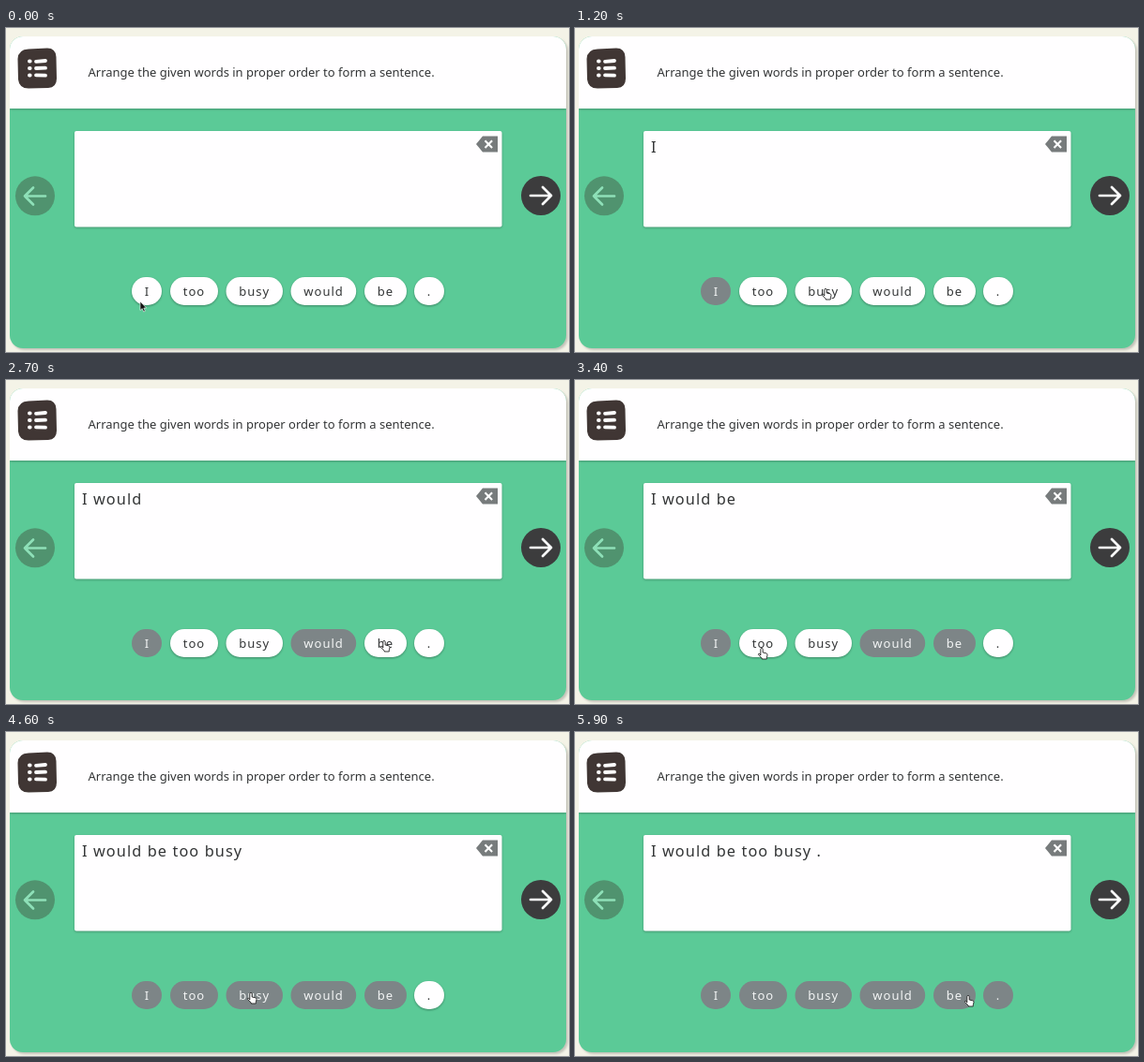
Write an HTML page that moves like this. It is 600x346 px and loops after 6000 ms.

```html
<!DOCTYPE html>
<html lang="en">
<head>
<meta charset="utf-8">
<title>Arrange the words</title>
<style>
  html, body { margin: 0; width: 100%; height: 100%; overflow: hidden; background: #f4f3e7; }
  svg { display: block; width: 600px; height: 346px; }
  text { font-family: "Noto Sans", sans-serif; fill: #333536; white-space: pre; }
  .title { font-size: 13px; }
  .answer { font-size: 16.3px; letter-spacing: 1.1px; }
  .pill text { font-size: 13px; letter-spacing: 1px; }
  .pill rect { fill: #fffeff; filter: drop-shadow(0 1px 1px #0005); }
  .pill.used rect { fill: #7d8587; filter: none; }
  .pill.used text { fill: #f3f5f5; }
  .arrow { fill: none; stroke-width: 2.7; stroke-linecap: round; stroke-linejoin: round; }
  .board { filter: drop-shadow(0 1px 1px #0004); }
  .card { filter: drop-shadow(2px 2px 1px #0003); }
  #hand { fill: #fff; stroke: #222; stroke-width: .9; stroke-linejoin: round; }
  #pointer { fill: #111; stroke: #fff; stroke-width: .6; }
</style>
</head>
<body>
<svg viewBox="0 0 600 346">
  <defs>
    <clipPath id="cardShape"><rect x="4" y="9" width="593" height="333" rx="14"/></clipPath>
  </defs>
  <rect class="card" x="4" y="9" width="593" height="333" rx="14" fill="#5bca97"/>
  <g clip-path="url(#cardShape)">
    <rect class="board" x="4" y="0" width="593" height="86" fill="#fffeff"/>
  </g>

  <path d="M24 22.5L44 21.5Q53 21.5 53.5 31L54 54Q54 63.5 45 64L24 64.5Q14 64.5 13 55L12.5 33Q13 23 24 22.5Z" fill="#403634"/>
  <g stroke="#fff" stroke-width="4" stroke-linecap="round">
    <path d="M25 35.5h.6M25 43h.6M25 50.5h.6"/>
    <path d="M32 35.8L42 35M32 43L42 42.7M32 50.3L42 50.6" stroke-width="3.8"/>
  </g>
  <text class="title" x="87.5" y="52">Arrange the given words in proper order to form a sentence.</text>

  <rect class="board" x="73" y="110" width="455.5" height="102.5" rx="2" fill="#fffeff"/>
  <path d="M501 124L508 115.5H524V132.500H508Z" fill="#777b7c"/>
  <path d="M510.500 120.300l7.600 7.600m0 -7.600l-7.600 7.600" stroke="#fff" stroke-width="2.100"/>

  <circle cx="31" cy="179.300" r="21" fill="#50936f"/>
  <path class="arrow" d="M42 179.500H20M29 170.500l-9 9l9 9" stroke="#8ee0b8"/>
  <circle cx="570" cy="179" r="21" fill="#3c3c3d"/>
  <path class="arrow" d="M559 179H581M572 170l9 9l-9 9" stroke="#fff"/>

  <text class="answer" id="answer" x="81" y="133"></text>
  <g id="pills"></g>
  <g id="cursor">
    <path id="hand" d="M-1.200 7V.6Q-1 -.6 0 -.6T1.200 .6V4L4.800 4.800Q6.200 5.200 6 6.800L5.300 9.500V11H.2V10L-3.600 6.300Q-3.500 4.700 -2.300 5.300Z"/>
    <path id="pointer" d="M0 0V9.500L2.200 7.600L3.700 11L5.300 10.300L3.800 7H6.600Z"/>
  </g>
</svg>
<script>
  const LOOP = 6000, STEP = 100;
  const SVG = "http://www.w3.org/2000/svg";
  const byId = id => document.getElementById(id);

  // word, left edge, width, moment of the click
  const pills = [
    ["I", 134, 32, 500],
    ["too", 175, 51, 3700],
    ["busy", 234.5, 60.5, 4500],
    ["would", 303.5, 69.7, 1800],
    ["be", 382, 45, 2900],
    [".", 435, 32, 5600]
  ].map(([word, x, width, click]) => ({ word, x, width, click }));
  const clickOrder = [...pills].sort((a, b) => a.click - b.click);

  // time, x, y of the cursor tip
  const route = [
    [0, 143, 292], [300, 148, 283], [900, 148, 283],
    [1200, 267, 279], [1600, 329, 281], [1800, 329, 281],
    [2400, 403, 279], [2900, 403, 279],
    [3400, 199, 287], [3600, 199, 284], [4000, 199, 284],
    [4300, 261, 279], [4700, 261, 279],
    [5400, 449, 282], [5600, 449, 282], [5900, 419, 282], [6000, 419, 282]
  ];

  function add(parent, tag, attrs) {
    const node = document.createElementNS(SVG, tag);
    for (const key in attrs) node.setAttribute(key, attrs[key]);
    return parent.appendChild(node);
  }

  for (const pill of pills) {
    pill.node = add(byId("pills"), "g", { class: "pill" });
    add(pill.node, "rect", { x: pill.x, y: 266, width: pill.width, height: 30, rx: 15 });
    add(pill.node, "text", { x: pill.x + 13.8, y: 285.5 }).textContent = pill.word;
  }

  function cursorAt(time) {
    const next = route.findIndex(stop => stop[0] > time);
    const [t0, x0, y0] = route[next - 1], [t1, x1, y1] = route[next];
    const p = (time - t0) / (t1 - t0), eased = p * p * (3 - 2 * p);
    return [x0 + (x1 - x0) * eased, y0 + (y1 - y0) * eased];
  }

  function draw(now) {
    const time = Math.floor(now % LOOP / STEP) * STEP;
    for (const pill of pills) pill.node.classList.toggle("used", time >= pill.click);
    byId("answer").textContent = clickOrder
      .filter(pill => time >= pill.click).map(pill => pill.word).join(" ");

    const [x, y] = cursorAt(time);
    const onPill = time > 0 && pills.some(pill => x >= pill.x && x <= pill.x + pill.width);
    byId("cursor").setAttribute("transform", `translate(${x} ${y})`);
    byId("hand").style.display = onPill ? "" : "none";
    byId("pointer").style.display = onPill ? "none" : "";
  }

  let start;
  function tick(now) {
    start ??= now;
    draw(now - start);
    requestAnimationFrame(tick);
  }
  draw(0);
  requestAnimationFrame(tick);
</script>
</body>
</html>
```
